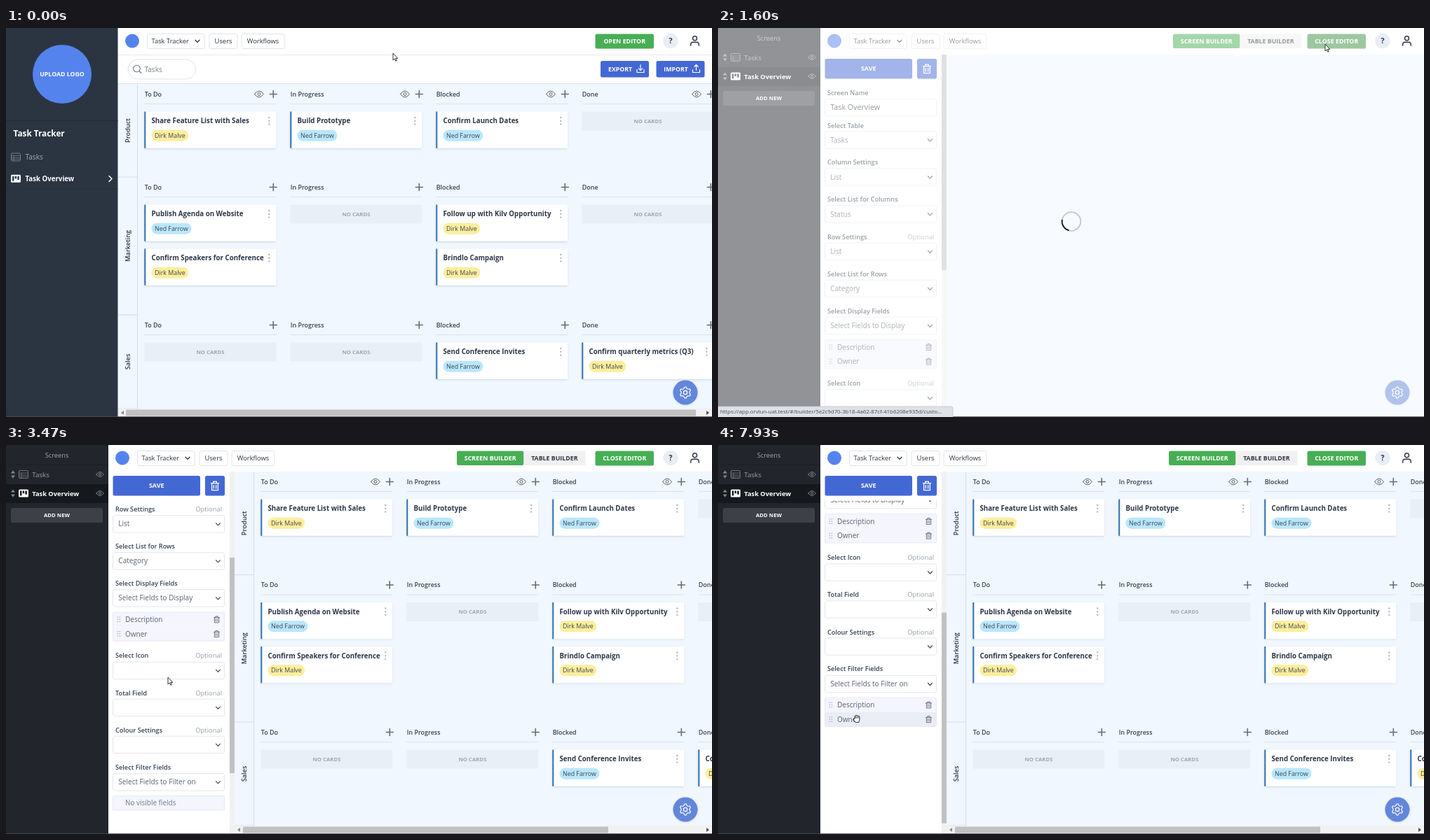
An HTML page with a canvas that plays this animation: 1007x556 px, repeating every 8 s.

```html
<!DOCTYPE html>
<html lang="en">
<head>
<meta charset="utf-8">
<title>Task board</title>
<style>
html, body { margin: 0; width: 100%; height: 100%; overflow: hidden; background: #fff; }
canvas { display: block; width: 1007px; height: 556px; }
</style>
</head>
<body>
<canvas id="stage"></canvas>
<script>
const W = 1007, H = 556, LOOP = 8000, FPS = 15;
const canvas = document.getElementById('stage');
const dpr = window.devicePixelRatio || 1;
canvas.width = Math.round(W * dpr);
canvas.height = Math.round(H * dpr);
const c = canvas.getContext('2d');

const INK = '#2d3748', GREEN = '#48ae55', GREEN_HOVER = '#389142', BLUE = '#4468d3', LOGO = '#5583ee';
const FONT = '"Open Sans", "Noto Sans", sans-serif';
const PEOPLE = [['Dirk Malve', '#fcee9c'], ['Ned Farrow', '#b9e7fd']];
const COLUMNS = ['To Do', 'In Progress', 'Blocked', 'Done'];
const LANES = [
  ['Product', [['Share Feature List with Sales', 0]], [['Build Prototype', 1]], [['Confirm Launch Dates', 1]], []],
  ['Marketing', [['Publish Agenda on Website', 1], ['Confirm Speakers for Conference', 0]], [],
    [['Follow up with Kilv Opportunity', 0], ['Brindlo Campaign', 0]], []],
  ['Sales', [], [], [['Send Conference Invites', 1]], [['Confirm quarterly metrics (Q3)', 0]]]
];
// label, label y, box y, value, optional
const FIELDS = [
  ['Screen Name', 92.5, 113.5, 'Task Overview'],
  ['Select Table', 139.5, 160, 'Tasks'],
  ['Column Settings', 192, 213, 'List'],
  ['Select List for Columns', 245, 266, 'Status'],
  ['Row Settings', 298.5, 319.5, 'List', 1],
  ['Select List for Rows', 351.5, 372.5, 'Category'],
  ['Select Display Fields', 404.5, 425.5, 'Select Fields to Display'],
  ['Select Icon', 507.5, 529, '', 1],
  ['Total Field', 561, 582, '', 1],
  ['Colour Settings', 614.5, 635, '', 1],
  ['Select Filter Fields', 667, 688.5, 'Select Fields to Filter on']
];
const OPTIONS = ['Description', 'Owner', 'Status', 'Category', 'Due Date'];
const URLS = [
  'https://app.orvlun-uat.test/#/builder/5e2c9d70-3b18-4a62-87cf-41b6208e935d/custo...',
  'https://app.orvlun-uat.test/#/apps/5e2c9d70-3b18-4a62-87cf-41b6208e935d/custom/f...'
];
// pointer path: step, x, y
const PATH = [
  [1, 552, 36], [4, 590, 46], [7, 690, 49], [11, 805, 40], [14, 859, 30], [16, 866, 23], [32, 866, 23],
  [33, 708, 88], [34, 578, 144], [35, 472, 192], [37, 328, 266], [39, 255, 311], [42, 231, 332],
  [58, 231, 332], [62, 224, 341], [75, 224, 341], [77, 190, 352], [78, 164, 366], [80, 198, 381],
  [81, 198, 381], [83, 202, 378], [86, 202, 378], [91, 208, 356], [94, 211, 346],
  [100, 211, 346], [103, 170, 374], [106, 196, 390]
];

const clamp = v => Math.max(0, Math.min(1, v));
const easeOut = v => 1 - (1 - clamp(v)) ** 2;

function text(s, x, y, size, color = INK, weight = 400, align = 'left') {
  c.font = `${weight} ${size}px ${FONT}`;
  c.textAlign = align;
  c.fillStyle = color;
  c.fillText(s, x, y + size * 0.355);
}
function rect(x, y, w, h, color) {
  c.fillStyle = color;
  c.fillRect(x, y, w, h);
}
function box(x, y, w, h, r, fill, stroke) {
  c.beginPath();
  c.roundRect(x, y, w, h, r);
  if (fill) { c.fillStyle = fill; c.fill(); }
  if (stroke) { c.strokeStyle = stroke; c.lineWidth = 0.8; c.stroke(); }
}
function disc(x, y, r, color) {
  c.beginPath();
  c.arc(x, y, r, 0, 7);
  c.fillStyle = color;
  c.fill();
}
function ring(x, y, r, color, w, a = 0, b = 7) {
  c.beginPath();
  c.arc(x, y, r, a, b);
  c.strokeStyle = color;
  c.lineWidth = w;
  c.stroke();
}
function stroke(d, x, y, color, w) {
  c.save();
  c.translate(x, y);
  c.strokeStyle = color;
  c.lineWidth = w;
  c.lineJoin = c.lineCap = 'round';
  c.stroke(new Path2D(d));
  c.restore();
}
function shape(d, x, y, fill, line) {
  const p = new Path2D(d);
  c.save();
  c.translate(x, y);
  c.fillStyle = fill;
  c.fill(p);
  if (line) { c.strokeStyle = line; c.lineWidth = 0.9; c.lineJoin = 'round'; c.stroke(p); }
  c.restore();
}
function shadow(color, blur, dy) {
  c.shadowColor = color;
  c.shadowBlur = blur * dpr;
  c.shadowOffsetY = dy * dpr;
}
function noShadow() { c.shadowColor = 'transparent'; }
function clipped(x, y, w, h, draw) {
  c.save();
  c.beginPath();
  c.rect(x, y, w, h);
  c.clip();
  draw();
  c.restore();
}

const down = (x, y, color = '#4a5260') => stroke('M-3-1.5L0 1.7L3-1.5', x, y, color, 1.3);
const plus = (x, y) => stroke('M-5 0H5M0-5V5', x, y, '#666c76', 1.6);
function eye(x, y, color, k = 1) {
  stroke(`M${-6.5 * k} 0Q0 ${-9 * k} ${6.5 * k} 0Q0 ${9 * k} ${-6.5 * k} 0Z`, x, y, color, 1);
  ring(x, y, 2 * k, color, 1);
}
function trash(x, y, color, w, k) {
  c.save();
  c.translate(x, y);
  c.scale(k, k);
  stroke('M-4.5-3H4.5M-1.8-3V-5H1.8V-3M-3.5-3V5H3.5V-3M-1.3-.8V3M1.3-.8V3', 0, 0, color, w / k);
  c.restore();
}
function button(label, x, y, w, h, fill, size = 8.88, tx = x + w / 2, color = '#fff') {
  box(x, y, w, h, 2.5, fill);
  text(label, tx, y + h / 2, size, color, 700, 'center');
}
function listIcon(x, y, color) {
  box(x - 6.5, y - 5.5, 13, 11, 1.5, null, color);
  stroke('M-6-2H6M-6 .8H6M-6 3.2H6M-3-2V5', x, y, color, 0.6);
}
function boardIcon(x, y, dark) {
  box(x - 7, y - 5.5, 14, 11, 1.5, '#fff');
  rect(x - 5, y - 3.5, 2.4, 6.8, dark);
  rect(x - 1.3, y - 3.5, 2.4, 3.5, dark);
  rect(x + 2.4, y - 3.5, 2.4, 5.2, dark);
}

function card(x, y, [title, who]) {
  shadow('rgba(60,80,110,.25)', 3, 1);
  rect(x, y, 188, 52.3, '#fff');
  noShadow();
  rect(x, y, 2, 52.3, '#2b6fae');
  text(title, x + 10.2, y + 13.2, 9.72, INK, 700);
  const [name, tint] = PEOPLE[who];
  c.font = `400 8.85px ${FONT}`;
  box(x + 10.2, y + 26.2, c.measureText(name).width + 9, 16, 8, tint);
  text(name, x + 14.7, y + 34, 8.85, '#3d4452');
  for (let i = -1; i < 2; i++) disc(x + 178, y + 13.3 + i * 4.8, 1.15, '#a9afb8');
}

function board(x0, tops) {
  clipped(x0, tops[0], W - x0, 544 - tops[0], () => {
    rect(x0, tops[0], W, H, '#f0f7ff');
    LANES.forEach(([name, ...cols], r) => {
      const top = tops[r], end = tops[r + 1];
      c.save();
      c.translate(x0 + 14, (top + end) / 2);
      c.rotate(-Math.PI / 2);
      text(name, 0, 0, 9.2, INK, 600, 'center');
      c.restore();
      rect(x0, end - 0.5, 27.5, 1, '#d5dee9');
      cols.forEach((cards, i) => {
        const x = x0 + 37.3 + 208 * i;
        text(COLUMNS[i], x + 0.4, top + 14.5, 8.95, '#364153', 600);
        if (!r) eye(x + 163.7, top + 14.5, '#5b626d');
        plus(x + 184, top + 14.5);
        rect(x, top + 28, 188, 1, '#dbe3ec');
        cards.forEach((item, n) => card(x, top + 39.5 + 63 * n, item));
        if (!cards.length) {
          rect(x, top + 39.5, 188, 27, '#e8eff7');
          text('NO CARDS', x + 94.2, top + 53, 7.75, '#9fa6b0', 700, 'center');
        }
      });
    });
    rect(x0 + 27, tops[0], 1, H, '#d5dee9');
  });
}
function hScroll(x, from, to) {
  rect(x, 544, W - x, 12, '#f1f1f1');
  rect(from, 545.5, to - from, 9, '#c1c1c1');
  shape('M2-3V3L-2 0Z', x + 6, 550, '#8a8a8a');
  shape('M-2-3V3L2 0Z', 1001, 550, '#505050');
}
function gear() {
  shadow('rgba(40,60,110,.2)', 3, 0.5);
  disc(969, 521, 17.5, '#6387da');
  noShadow();
  const pts = [];
  for (let i = 0; i < 24; i++) {
    const a = (i - 0.5) * Math.PI / 12, r = i % 4 < 2 ? 8 : 6;
    pts.push((r * Math.sin(a)).toFixed(2) + ' ' + (-r * Math.cos(a)).toFixed(2));
  }
  stroke('M' + pts.join('L') + 'Z', 969, 521, '#fff', 1.2);
  ring(969, 521, 2.7, '#fff', 1.2);
}
function nav(x) {
  rect(x - 20, 0, W, 38, '#fff');
  disc(x, 18.5, 10, LOGO);
  [['Task Tracker', 21.5, 81.5], ['Users', 110, 40], ['Workflows', 156, 61]].forEach(([s, dx, w], i) => {
    box(x + dx, 8.5, w, 21, 2.5, '#fff', '#d9dde3');
    text(s, x + dx + (i ? w / 2 : 6), 18.7, 9.38, '#2c3442', 400, i ? 'center' : 'left');
  });
  down(x + 93, 18.7, '#2c3442');
}
function account() {
  disc(948, 18.5, 10.7, '#e9edf4');
  text('?', 948, 18.7, 10.5, INK, 700, 'center');
  ring(982.5, 14.8, 3, '#2c3442', 1.4);
  stroke('M-5.8 6.5V5Q-5.8 1.5-2.5 1.5H2.5Q5.8 1.5 5.8 5V6.5', 982.5, 18.7, '#2c3442', 1.4);
}

function home(k) {
  rect(0, 0, W, H, '#fff');
  rect(0, 0, 159.5, H, '#2b3542');
  disc(80, 66, 42, LOGO);
  text('UPLOAD LOGO', 80, 66, 8.75, '#fff', 700, 'center');
  rect(0, 132, 159.5, 1, '#222b36');
  text('Task Tracker', 10.5, 151.3, 11.8, '#fff', 700);
  listIcon(14, 184.5, '#8a929d');
  text('Tasks', 27.5, 184.7, 10.08, '#a1a8b1');
  rect(0, 230, 159.5, 1, '#26303c');
  boardIcon(14, 215.3, '#2b3542');
  text('Task Overview', 27.5, 215.5, 9.7, '#fff', 700);
  stroke('M-2-4L2 0L-2 4', 149, 215.5, '#fff', 1.5);
  nav(180);
  rect(160, 38, W, 1, '#e6e9ee');
  button('OPEN EDITOR', 840.5, 8.5, 83.5, 21, k >= 16 ? GREEN_HOVER : GREEN);
  account();
  box(174, 45, 96.5, 28, 14, '#fff', '#d9dde3');
  ring(186.5, 58, 4.8, '#6f7783', 1.1);
  stroke('M0 0L3 3', 190, 61.5, '#6f7783', 1.1);
  text('Tasks', 197.5, 59, 10.08, '#7b828d');
  [['EXPORT', 848, 'M0-6V2M-2.8-.6L0 2.2L2.8-.6'], ['IMPORT', 927.5, 'M0 2V-6M-2.8-3.2L0-6L2.8-3.2']].forEach(([s, x, d]) => {
    button(s, x, 47, 69, 23.5, BLUE, 8.75, x + 28);
    stroke(d + 'M-5 1V5H5V1', x + 57, 58.5, '#fff', 1.2);
  });
  rect(160, 79, W, 1, '#dfe6ee');
  board(160, [80, 213, 410, 544]);
  hScroll(160, 171, 984);
  gear();
}

function itemRow(label, y, hover) {
  rect(152.5, y - 10.3, 159, 20.6, hover ? '#eaedf6' : '#f4f5fd');
  for (let i = 0; i < 6; i++) rect(158.6 + (i % 2) * 3, y - 4 + (i >> 1) * 3.2, 1.5, 1.5, '#b4b9c4');
  text(label, 170, y, 10, '#5a6272');
  trash(300.5, y, '#5f6675', 0.9, 0.9);
}
function form(scroll, rows) {
  rect(146, 38, 173, H, '#fff');
  clipped(146, 79.5, 173, H - 79.5, () => {
    c.translate(0, -scroll);
    FIELDS.forEach(([label, ly, y, value, optional], i) => {
      text(label, 156, ly, 9.17, '#364153', 600);
      if (optional) text('Optional', 308, ly, 9.4, '#979da7', 400, 'right');
      box(152.5, y - 12.2, 159, 24.4, 2.5, '#fff', '#dde0e6');
      text(value, 160.3, y, i ? 10.05 : 10.7, i ? '#5a6272' : '#333b49');
      if (i) down(302.5, y + 0.3);
    });
    const frame = (y, n) => box(152.5, y - 10.4, 159, 20.6 * n, 1.5, null, '#e4e6f0');
    itemRow('Description', 456, false);
    itemRow('Owner', 476.6, false);
    frame(456, 2);
    if (!rows) {
      rect(152.5, 708, 159, 21, '#f4f5fd');
      text('No visible fields', 170, 718.3, 9.95, '#727987');
    }
    for (let i = 0; i < rows; i++) itemRow(OPTIONS[i], 718.5 + 20.6 * i, i === 1);
    frame(718.5, Math.max(1, rows));
  });
  button('SAVE', 152.5, 44, 124.5, 28.5, BLUE, 9);
  box(284, 44, 28, 28.5, 2.5, BLUE);
  trash(298, 58.3, '#fff', 1.3, 1.25);
  const view = 518, total = 871 + 20.5 * Math.max(0, rows - 1);
  rect(319, 38, 7, view, '#f1f1f1');
  rect(319, 38 + scroll * view / total, 7, view * view / total, '#c1c1c1');
}
function menu(rows) {
  const left = OPTIONS.slice(rows), top = 355;
  shadow('rgba(0,0,0,.2)', 4, 1);
  box(152.5, top, 159, 6 + 20.5 * (left.length + 1), 2.5, '#fff', '#d3d7de');
  noShadow();
  text('Tasks', 160.3, top + 13, 8.6, '#979da7', 600);
  left.forEach((s, i) => {
    const y = top + 33.7 + 20.5 * i;
    if (!i) rect(153, y - 10.2, 158, 20.5, '#e3e9fb');
    text(s, 164, y, 10, '#4a5262');
  });
}
function sidebar() {
  rect(0, 0, 146, H, '#22262c');
  rect(0, 28, 146, 1, '#1c2025');
  text('Screens', 72.5, 14.3, 9.3, '#a2a5aa', 400, 'center');
  rect(0, 56, 146, 27, '#15181c');
  [42, 69].forEach(y => {
    shape('M-3-1.5H3L0-5.5ZM-3 1.5H3L0 5.5Z', 10, y, '#85898f');
    eye(134, y, '#80848a', 0.8);
  });
  listIcon(25, 42, '#85898f');
  boardIcon(25, 69, '#15181c');
  text('Tasks', 37.3, 42.3, 9.8, '#9a9da2');
  text('Task Overview', 37.3, 69.3, 9.3, '#fff', 700);
  button('ADD NEW', 7, 90, 131, 21, '#3d4147', 7.75);
}
function editor(k) {
  const loading = k < 27;
  const rows = k < 87 ? 0 : k < 119 ? 1 : 2;
  const scroll = 246 * easeOut((k - 46) / 10) + 101 * easeOut((k - 58) / 10);
  rect(0, 0, W, H, '#fff');
  sidebar();
  nav(166);
  if (loading) rect(326, 38, W, H, '#f0f7ff');
  else {
    board(326, [38, 185.5, 396, 544]);
    hScroll(326, 338, 859);
  }
  const x = loading ? 649 : 643;
  button('SCREEN BUILDER', x, 8.5, 95.5, 20.5, GREEN);
  button('TABLE BUILDER', x + 95.5, 8.5, 88, 20.5, '#f0f0f0', 8.8, x + 139.3, '#2c3442');
  button('CLOSE EDITOR', 840.5, 8.5, 83.5, 21, k < 33 ? GREEN_HOVER : GREEN);
  form(scroll, rows);
  gear();
  if (loading) {
    rect(0, 0, W, H, 'rgba(255,255,255,.5)');
    ring(504, 276.5, 13.3, '#c3c6ca', 1.8);
    const a = (105 + (k - 24) * 25) * Math.PI / 180;
    ring(504, 276.5, 13.3, '#111', 1.8, a, a + 1.5);
  }
  account();
  if ((k >= 71 && k < 87) || (k >= 97 && k < 119)) menu(rows);
}

function status(k) {
  if (k < 19 || k > 41) return;
  c.globalAlpha = clamp((42 - k) / 3);
  box(-3, 541, 338, 18, 3, '#dee1e6', '#c3c7cd');
  text(URLS[k < 27 ? 0 : 1], 3, 548.3, 7.85, '#464b52');
  c.globalAlpha = 1;
}
function pointer(k) {
  let i = 0;
  while (i < PATH.length - 1 && PATH[i + 1][0] <= k) i++;
  const a = PATH[i], b = PATH[i + 1] || a;
  const p = b === a ? 0 : clamp((k - a[0]) / (b[0] - a[0]));
  const x = a[1] + (b[1] - a[1]) * p, y = a[2] + (b[2] - a[2]) * p;
  if (k >= 16 && k < 20) {
    shape('M-1 1Q0-.6 1 1V4.5Q4.8 4.4 5.2 6.4V9Q4.5 10 4.2 12H-1.2Q-2.2 9.6-3.6 7.6Q-3.4 5.8-1 7.4Z', x, y, '#fff', '#111');
  } else if ((k >= 87 && k < 90) || k >= 119) {
    shape('M-2.6.5V-3.5Q-1.8-4.6-1-3.7Q-.4-5.8.8-4.2Q2-5.2 2.6-3.5Q4.4-4 4.4-2V2Q3.6 3.6 3.3 5.4H-1.6Q-2.6 3.5-4.6 1Q-4.2-.6-2.6.5Z', x + 1.5, y + 1, '#fff', '#111');
    stroke('M-1-3V-.6M.8-3.4V-.6M2.6-3V-.6', x + 1.5, y + 1, '#111', 0.7);
  } else {
    shape('M0 0V10L2.3 7.9L3.8 11.2L5.3 10.5L3.8 7.3H6.8Z', x, y, '#fff', '#222');
  }
}

function frame(now) {
  const k = Math.floor(((now + 4) % LOOP) * FPS / 1000);
  c.setTransform(dpr, 0, 0, dpr, 0, 0);
  if (k < 20) home(k); else editor(k);
  rect(0, 555.2, W, 0.8, '#4a4f57');
  status(k);
  pointer(k);
}
const start = performance.now();
function tick() {
  frame(performance.now() - start);
  requestAnimationFrame(tick);
}
tick();
</script>
</body>
</html>
```
